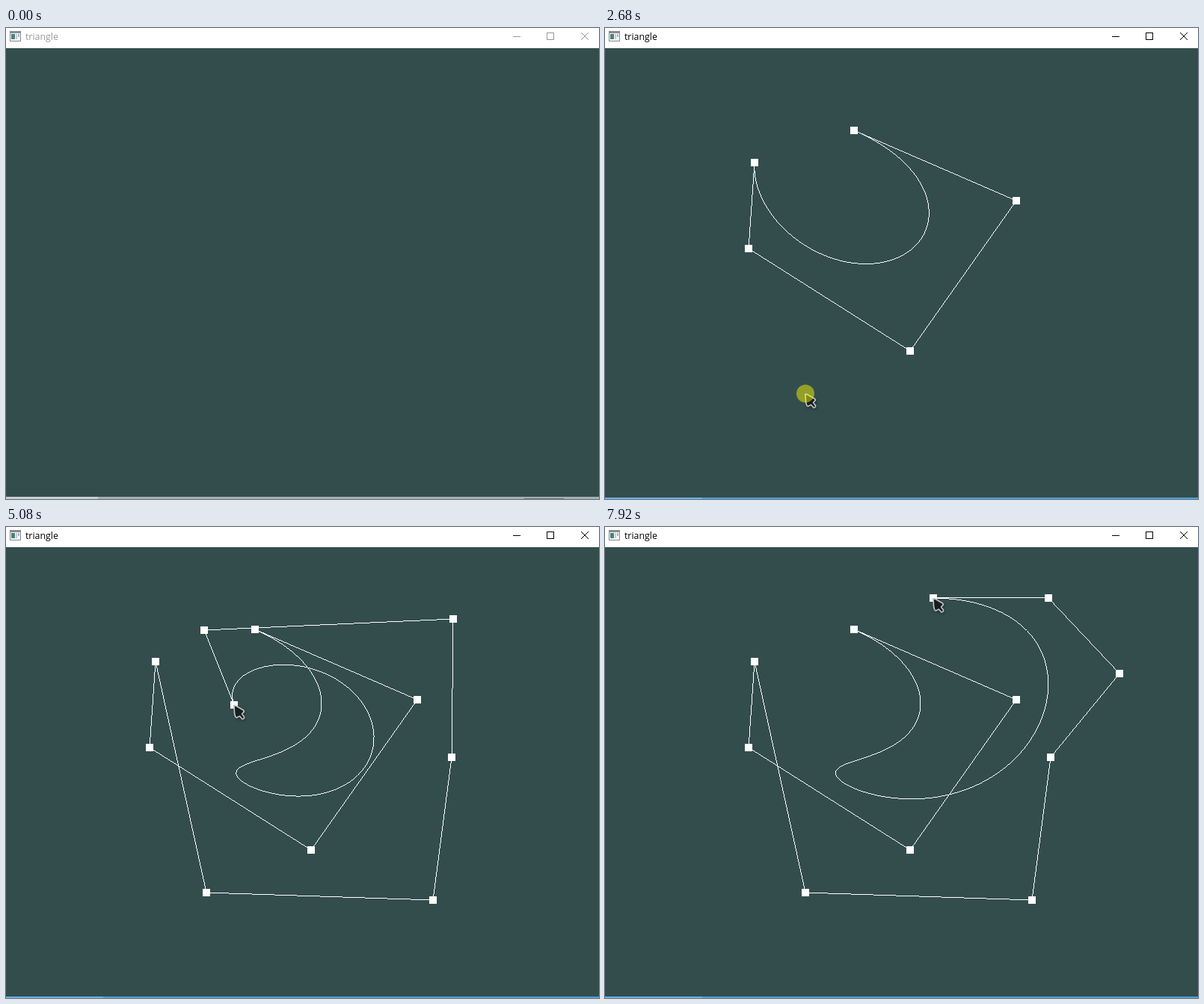
An HTML page with a canvas that plays this animation: 793 by 630 pixels, repeating every 8 s.

```html
<!DOCTYPE html>
<html lang="en">
<head>
<meta charset="utf-8">
<style>
html, body { margin: 0; width: 100%; height: 100%; overflow: hidden; background: #fff; }
canvas { display: block; }
</style>
</head>
<body>
<canvas width="793" height="630"></canvas>
<script>
const ctx = document.querySelector('canvas').getContext('2d');
const LOOP = 8000, STEP = 40;           // ms
const PRESS = 80, REST = 160, TRAVEL = 320;
const ENTRY = [0, 720, 660];            // the pointer comes in from below

// Control points: time the button is released, x, y
const clicks = [
  [600, 333, 137], [1040, 550, 231], [1360, 408, 432], [1720, 192, 295],
  [2200, 200, 180], [2720, 268, 489], [3120, 571, 499], [3440, 596, 308],
  [3840, 598, 123], [4520, 265, 138], [5080, 305, 238],
  [6800, 688, 196], [7120, 593, 95], [7560, 439, 95]
];
const hover = [4200, 374, 117];         // a pause without a click
const undos = [0, 1, 2].map(i => [5520 + 320 * i]);

const byTime = (a, b) => a[0] - b[0];
const events = [...clicks, ...undos].sort(byTime);
const route = [ENTRY, ...[...clicks, hover].sort(byTime)];
const focusTime = clicks[0][0] - PRESS;

// The pointer reaches each stop REST ms before leaving it.
function pointerAt(t) {
  const next = route.findIndex(stop => stop[0] > t);
  if (next < 0) return route.at(-1).slice(1);
  const [left, x0, y0] = route[next - 1], [leave, x1, y1] = route[next];
  const arrive = leave - REST, begin = Math.max(left, arrive - TRAVEL);
  const u = Math.min(1, Math.max(0, (t - begin) / (arrive - begin)));
  const e = u * u * (3 - 2 * u);
  return [Math.round(x0 + (x1 - x0) * e), Math.round(y0 + (y1 - y0) * e)];
}

function pointsAt(t) {
  const points = [];
  for (const [time, ...place] of events) {
    if (time > t) break;
    if (place.length) points.push(place); else points.pop();
  }
  return points;
}

function rect(color, x, y, w, h) {
  ctx.fillStyle = color;
  ctx.fillRect(x, y, w, h);
}

// One-pixel line without smoothing, sampled at pixel centres along the longer axis
function line(a, b) {
  const major = Math.abs(b[0] - a[0]) >= Math.abs(b[1] - a[1]) ? 0 : 1;
  if (a[major] > b[major]) [a, b] = [b, a];
  const length = b[major] - a[major];
  for (let p = Math.ceil(a[major] - 0.5); p + 0.5 < b[major]; p++) {
    const u = (p + 0.5 - a[major]) / length;
    const x = a[0] + (b[0] - a[0]) * u, y = a[1] + (b[1] - a[1]) * u;
    ctx.fillRect(Math.floor(x), Math.ceil(y) - 1, 1, 1);
  }
}

function polyline(points) {
  for (let i = 1; i < points.length; i++) line(points[i - 1], points[i]);
}

function bezier(points, u) {
  let p = points;
  while (p.length > 1) {
    p = p.slice(1).map(([x, y], i) => [p[i][0] + (x - p[i][0]) * u, p[i][1] + (y - p[i][1]) * u]);
  }
  return p[0];
}

function drawWindow(active) {
  const ink = active ? '#000' : '#999';
  rect('#fff', 0, 0, 793, 27);
  rect('#334d4d', 0, 27, 793, 603);

  rect('#858c92', 5, 4, 15, 14);
  rect('#f4f6f7', 6, 7, 13, 10);
  rect('#4b8279', 7, 8, 5, 7);
  rect('#c4cbd2', 13, 8, 2, 7);
  rect('#aab4bd', 16, 8, 2, 4);

  ctx.fillStyle = ink;
  ctx.font = '12.4px "Open Sans", "Noto Sans", sans-serif';
  ctx.fillText('triangle', 26, 16);

  ctx.fillRect(678, 11, 10, 1);
  ctx.strokeStyle = ink;
  ctx.lineWidth = 1;
  ctx.strokeRect(723.5, 6.5, 9, 9);
  ctx.beginPath();
  ctx.moveTo(769, 6); ctx.lineTo(779, 16);
  ctx.moveTo(779, 6); ctx.lineTo(769, 16);
  ctx.stroke();

  if (active) {
    rect('#4a9fdb', 0, 628, 793, 2);
    rect('#69b1e2', 0, 628, 130, 2);
  } else {
    rect('#a4b0b0', 0, 627, 793, 3);
    rect('#c6cfce', 0, 627, 123, 3);
    for (let x = 693; x < 746; x += 2) rect('#333', x, 629, 1, 1);
  }
}

function drawPointer(x, y) {
  const shape = new Path2D(
    'M0 0.5L3 1.5L12.5 7Q14 8.5 12.5 10L10.5 12L13.5 16Q14 18.5 11 19L7.5 15L3.5 17Q1.5 17 0.5 11Z');
  ctx.save();
  ctx.translate(x, y);
  ctx.shadowColor = 'rgba(0,0,0,.55)';
  ctx.shadowBlur = 4;
  ctx.shadowOffsetX = 1;
  ctx.shadowOffsetY = 2;
  ctx.fillStyle = '#171e22';
  ctx.fill(shape);
  ctx.shadowColor = 'transparent';
  ctx.strokeStyle = '#bcc2c2';
  ctx.lineWidth = 1.7;
  ctx.lineJoin = 'round';
  ctx.stroke(shape);
  ctx.restore();
}

function draw(now) {
  const t = Math.floor(now % LOOP / STEP) * STEP;
  const points = pointsAt(t);
  const [x, y] = pointerAt(t);
  const pressed = events.find(([time]) => t >= time - PRESS && t < time);

  drawWindow(t >= focusTime);
  ctx.fillStyle = '#fff';
  polyline(points);
  if (points.length > 2) {
    polyline(Array.from({ length: 101 }, (_, i) => bezier(points, i / 100)));
  }
  for (const [px, py] of points) ctx.fillRect(px - 5, py - 5, 10, 10);

  drawPointer(x, y);
  if (pressed) {
    const undo = pressed.length === 1;
    ctx.fillStyle = undo ? 'rgba(255,0,0,.47)' : 'rgba(255,255,0,.47)';
    ctx.beginPath();
    ctx.arc(x, y, 12, 0, 7);
    ctx.fill();
  }
}

const start = performance.now();
function frame() {
  draw(performance.now() - start);
  requestAnimationFrame(frame);
}
frame();
</script>
</body>
</html>
```
